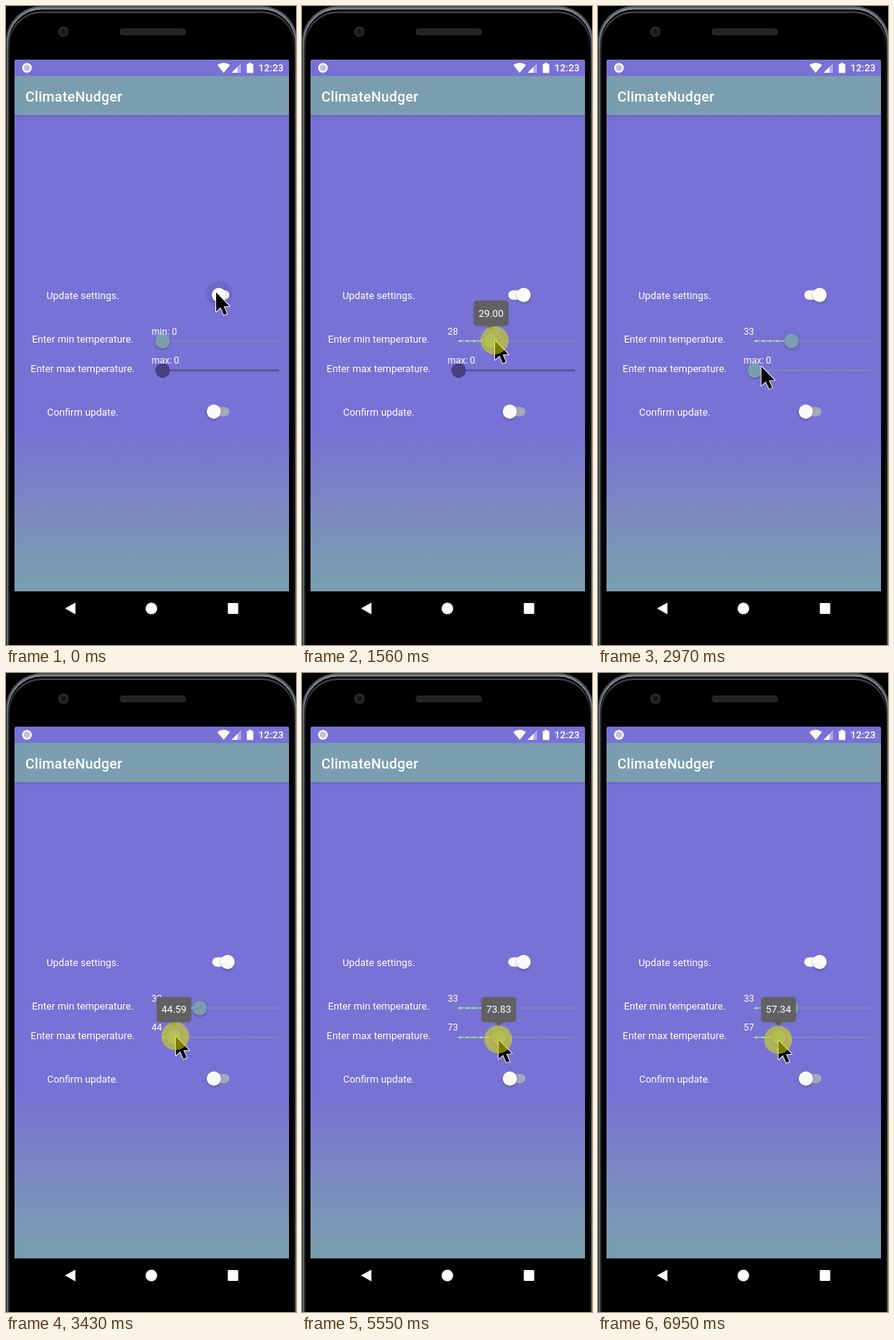
These frames come from a looping animation (374 by 822 pixels, 8000 ms). An HTML page with a canvas:

```html
<!DOCTYPE html>
<html lang="en">
<head>
<meta charset="utf-8">
<title>Temperature settings</title>
<style>
html, body { margin: 0; width: 100%; height: 100%; overflow: hidden; background: #000; }
canvas { display: block; width: 374px; height: 822px; }
</style>
</head>
<body>
<canvas id="stage" width="374" height="822"></canvas>
<script>
const ctx = document.getElementById('stage').getContext('2d');
const LOOP = 8000;
const PURPLE = '#7871d6', TEAL = '#7b9db0', WHITE = '#fafafa';
const FONT = 'Roboto, "Noto Sans", sans-serif';
const TRACK_L = 202, TRACK_R = 352, MIN_Y = 431, MAX_Y = 468.7;
const MIN_DRAG = [0, 0, 1.2, 7, 14.5, 22, 28.996, 30.2, 30.8, 31.1];

const clamp = p => Math.max(0, Math.min(1, p));
const smooth = p => (p = clamp(p), p * p * (3 - 2 * p));
const lerp = (a, b, p) => a + (b - a) * p;

// Number of the n discrete updates between start and end that have happened.
function steps(t, start, end, n) {
  if (t < start) return 0;
  return Math.min(n, Math.floor((t - start + 10) * (n - 1) / (end - start)) + 1);
}

function box(x, y, w, h, r, fill) {
  ctx.beginPath();
  ctx.roundRect(x, y, w, h, r);
  ctx.fillStyle = fill;
  ctx.fill();
}

function disc(x, y, r, fill) {
  ctx.beginPath();
  ctx.arc(x, y, r, 0, Math.PI * 2);
  ctx.fillStyle = fill;
  ctx.fill();
}

function poly(points, fill) {
  ctx.beginPath();
  points.forEach(([x, y]) => ctx.lineTo(x, y));
  ctx.closePath();
  ctx.fillStyle = fill;
  ctx.fill();
}

function text(str, x, y, size, align = 'left', weight = 400, spacing = 0) {
  ctx.font = `${weight} ${size}px ${FONT}`;
  ctx.letterSpacing = spacing + 'px';
  ctx.textAlign = align;
  ctx.fillStyle = '#fff';
  ctx.fillText(str, x, y);
}

function line(x1, x2, y, width, color, dash = []) {
  ctx.beginPath();
  ctx.moveTo(x1, y);
  ctx.lineTo(x2, y);
  ctx.setLineDash(dash);
  ctx.lineWidth = width;
  ctx.strokeStyle = color;
  ctx.stroke();
  ctx.setLineDash([]);
}

function withShadow(draw) {
  ctx.save();
  ctx.shadowColor = 'rgba(0,0,0,.32)';
  ctx.shadowBlur = 3;
  ctx.shadowOffsetY = 1;
  draw();
  ctx.restore();
}

// One outline of the case, brighter along the top than on the sides.
function rim(x, y, r, width, top, side) {
  const shine = ctx.createLinearGradient(0, 0, 0, 60);
  shine.addColorStop(0, top);
  shine.addColorStop(1, side);
  ctx.beginPath();
  ctx.roundRect(x, y, 376 - 2 * x, 900, r);
  ctx.lineWidth = width;
  ctx.strokeStyle = shine;
  ctx.stroke();
}

function phone() {
  ctx.fillStyle = '#000';
  ctx.fillRect(0, 0, 374, 822);
  rim(1, 1.5, 45, 2.5, '#596066', '#2b3033');
  rim(2.2, 3.5, 44, 2, '#8d939c', '#626c70');
  rim(4, 8, 42, 2, '#4a5056', '#15181a');

  disc(74, 33, 6.8, '#29292b');
  disc(74, 33, 3.6, '#14161c');
  box(146.5, 29, 85.5, 8.5, 4.2, '#2b2b2c');
  box(148, 30.5, 82.5, 5, 2.5, '#232324');

  poly([[76, 775], [89.5, 767.5], [89.5, 782.5]], '#fff');
  disc(187.5, 775, 7.5, '#fff');
  box(286, 768, 13.5, 14, 1, '#fff');
}

function screen() {
  const bg = ctx.createLinearGradient(0, 540, 0, 735);
  bg.addColorStop(0, PURPLE);
  bg.addColorStop(1, TEAL);
  box(11, 69, 354, 684, [2, 2, 0, 0], bg);

  const shade = ctx.createLinearGradient(0, 140, 0, 144);
  shade.addColorStop(0, 'rgba(40,40,90,.28)');
  shade.addColorStop(1, 'rgba(40,40,90,0)');
  ctx.fillStyle = shade;
  ctx.fillRect(11, 140, 354, 4);
  ctx.fillStyle = TEAL;
  ctx.fillRect(11, 90, 354, 50.5);
  text('ClimateNudger', 25, 122.5, 18, 'left', 500, 0.3);

  disc(27, 79.5, 6.3, '#fff');
  disc(27, 79.5, 4, '#c3c1e6');
  ctx.beginPath();
  ctx.moveTo(280.7, 86);
  ctx.lineTo(272.5, 76);
  ctx.quadraticCurveTo(280.7, 69.8, 289, 76);
  ctx.fillStyle = '#fff';
  ctx.fill();
  poly([[291, 86], [303, 86], [303, 73.5]], 'rgba(255,255,255,.4)');
  poly([[291, 86], [298.5, 86], [298.5, 78.2]], '#fff');
  box(310.5, 74.5, 8.5, 11.7, 1, '#fff');
  ctx.fillRect(313, 73, 3.5, 2);
  text('12:23', 325.5, 84.2, 12.8, 'left', 500);

  text('Update settings.', 99, 377, 12.9, 'center');
  text('Enter min temperature.', 99, 433, 12.9, 'center');
  text('Enter max temperature.', 99, 470.7, 12.9, 'center');
  text('Confirm update.', 99, 527, 12.9, 'center');
}

function toggle(left, y, thumbX, track) {
  box(left, y - 6, 288 - left, 12, 6, track);
  withShadow(() => disc(thumbX, y, 9.2, WHITE));
}

function slider(y, x, enabled, active) {
  if (!enabled) {
    line(TRACK_L, TRACK_R, y, 3, '#5b55a6');
    disc(x, y, 9.5, '#46417f');
    return;
  }
  line(TRACK_L, TRACK_R, y, 2.6, 'rgba(123,157,176,.3)');
  line(TRACK_L, TRACK_R, y, 1.6, 'rgba(123,157,176,.6)', [3, 2]);
  if (x > TRACK_L) {
    line(TRACK_L - 1, x, y, 3, TEAL);
    line(TRACK_L, x, y, 1.3, '#cfe0d6', [4, 2, 1, 2]);
  }
  if (active) disc(x, y, 18, 'rgba(123,157,176,.22)');
  withShadow(() => disc(x, y, 9.5, TEAL));
}

function tooltip(x, y, value, scale) {
  if (!scale) return;
  ctx.save();
  ctx.translate(x, y - 14);
  ctx.scale(scale, scale);
  box(-22.5, -38, 45, 32.5, 4, '#616163');
  poly([[-6, -6], [6, -6], [0, 0]], '#616163');
  text(value.toFixed(2), 0, -17.3, 12.9, 'center');
  ctx.restore();
}

function pointer(x, y) {
  ctx.save();
  ctx.translate(x, y);
  ctx.beginPath();
  [[0, 0], [0, 24.5], [5.7, 19.3], [10, 29], [14, 27.3], [9.8, 18], [17, 17.5]]
    .forEach(([px, py]) => ctx.lineTo(px, py));
  ctx.closePath();
  ctx.lineWidth = 1.8;
  ctx.lineJoin = 'round';
  ctx.strokeStyle = '#fff';
  ctx.stroke();
  ctx.fillStyle = '#000';
  ctx.fill();
  ctx.restore();
}

function render(t) {
  const flip = steps(t, 70, 160, 2);
  const approach = steps(t, 480, 950, 7);
  const minDrag = steps(t, 1180, 1800, 9);
  const travel = steps(t, 2330, 3110, 11);
  const maxDrag = steps(t, 3200, 3980, 11);
  const back1 = steps(t, 4530, 5070, 8);
  const back2 = steps(t, 5230, 5690, 7);
  const back3 = steps(t, 5870, 6240, 6);
  const back4 = steps(t, 6480, 6950, 7);

  const minVal = travel ? 33 : MIN_DRAG[minDrag];
  const minX = TRACK_L + minVal * 1.445;
  const pull = smooth((maxDrag - 1) / 10);
  const maxVal = 33 + 53.68 * pull
    - 8.58 * back1 / 8 - 5.98 * back2 / 7 - 7.52 * back3 / 6 - 7.26 * back4 / 7;
  const maxX = TRACK_L + (maxVal - 33) * 1.264;
  const maxOn = travel >= 4;
  const touchMin = minDrag >= 1 && travel < 3;
  const touchMax = travel === 11;

  let x, y;
  if (maxDrag) {
    x = maxX + 3 * (1 - pull);
    y = 467.5 + 3 * back1 / 8 + 2 * back2 / 7;
  } else if (travel) {
    const p = smooth((travel - 2) / 9);
    x = lerp(250, 205, p);
    y = lerp(430.5, 468.5, p);
  } else if (minDrag) {
    x = minDrag <= 6 ? lerp(204, 249, smooth((minDrag - 1) / 5)) : 249 + (minDrag - 6) / 3;
    y = 430.5;
  } else {
    const p = smooth(approach / 7);
    x = lerp(271, 204, p);
    y = lerp(368.5, 430.5, p);
  }

  phone();
  screen();
  if (flip < 2) disc(275, 371, 17, `rgba(90,80,170,${flip ? 0.15 : 0.3})`);
  toggle(266, 371.7, [274.5, 281, 285.8][flip], WHITE);
  toggle(260, 521.7, 268, '#a4a8ba');

  slider(MIN_Y, minX, true, touchMin);
  slider(MAX_Y, maxX, maxOn, touchMax);
  text(minDrag > 1 ? String(Math.floor(minVal)) : 'min: 0', 187.7, 422.7, 12);
  text(maxDrag > 1 ? String(Math.floor(maxVal)) : 'max: 0', 187.7, 460.2, 12);

  const minTip = travel ? [1, 1, 1, 0.6][travel] || 0 : minDrag > 2 ? 1 : minDrag > 1 ? 0.6 : 0;
  const maxTip = maxDrag > 2 ? 1 : maxDrag > 1 ? 0.6 : 0;
  tooltip(minX, MIN_Y, minVal, minTip);
  tooltip(maxX, MAX_Y, maxVal, maxTip);

  pointer(x, y);
  if (touchMin || touchMax) disc(x - 0.5, y - 0.5, 18, 'rgba(220,220,10,.56)');
}

const begin = performance.now();
function tick() {
  render((performance.now() - begin) % LOOP);
  requestAnimationFrame(tick);
}
tick();
</script>
</body>
</html>
```
